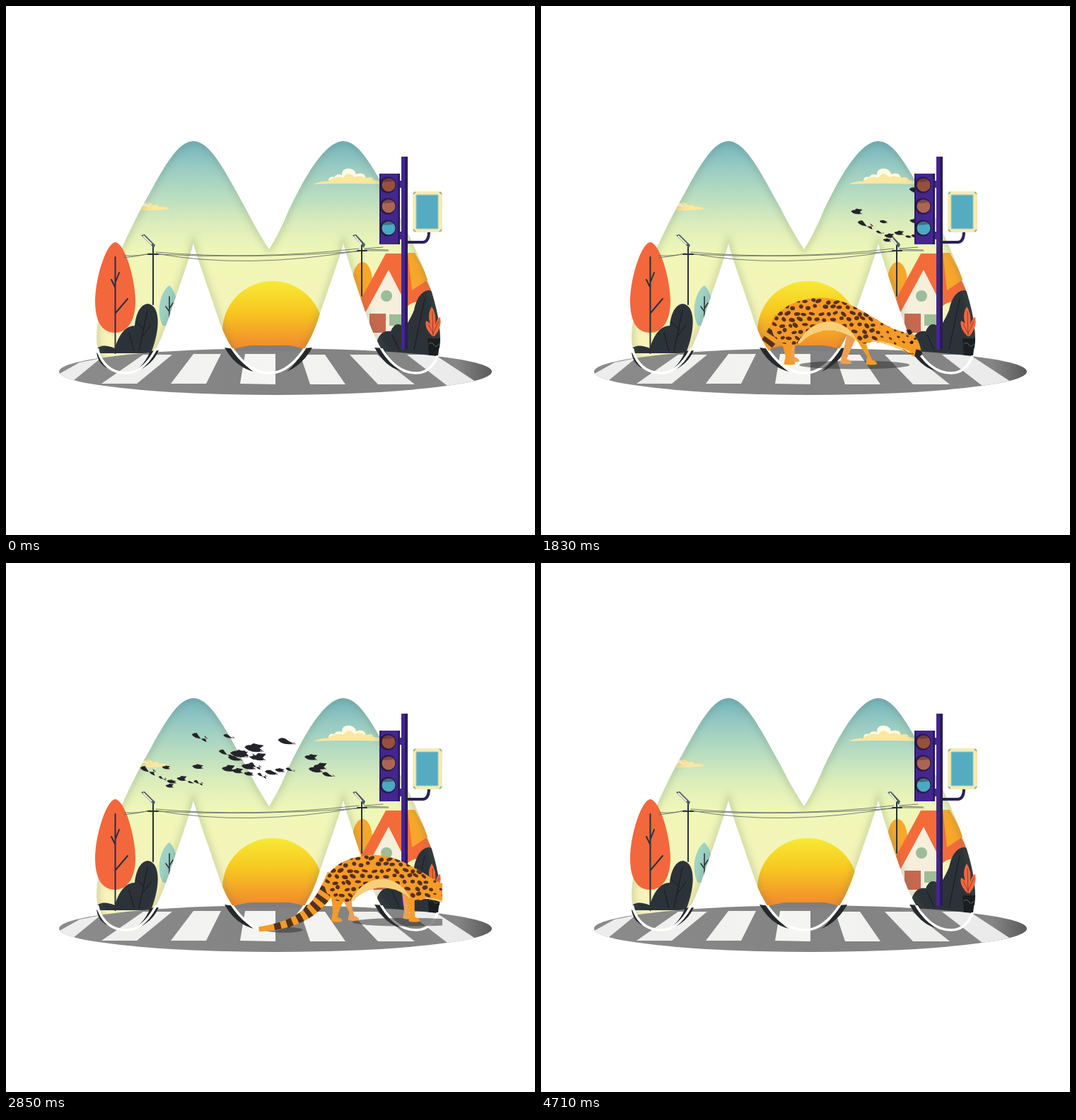
An HTML page that plays this animation: 748 px wide and 748 px high, repeating every 4.74 s.

```html
<!DOCTYPE html>
<html lang="en">
<head>
<meta charset="utf-8">
<title>Crossing</title>
<style>
html, body { margin: 0; width: 100%; height: 100%; overflow: hidden; background: #fff; }
svg { display: block; width: 100vw; height: 100vh; }
.line { fill: none; stroke: #26313a; stroke-linecap: round; }
.dark { fill: #2c3338; }
.coat { fill: #f59b26; }
</style>
</head>
<body>
<svg viewBox="0 0 748 748">
<defs>
  <linearGradient id="sky" x2="0" y2="1">
    <stop stop-color="#74b4bc"/><stop offset=".12" stop-color="#9accc3"/>
    <stop offset=".25" stop-color="#bcdfc0"/><stop offset=".36" stop-color="#dcedba"/>
    <stop offset=".48" stop-color="#eff7b7"/><stop offset="1" stop-color="#fbf1ba"/>
  </linearGradient>
  <linearGradient id="sunlight" x2="0" y2="1">
    <stop stop-color="#f7ea35"/><stop offset=".3" stop-color="#f7c820"/><stop offset=".64" stop-color="#f28e2c"/>
  </linearGradient>
  <linearGradient id="asphalt">
    <stop stop-color="#8b8b8b"/><stop offset=".5" stop-color="#838383"/>
    <stop offset=".92" stop-color="#858585"/><stop offset="1" stop-color="#5a5a5a"/>
  </linearGradient>
  <linearGradient id="paint">
    <stop stop-color="#ececec"/><stop offset=".5" stop-color="#f5f5f3"/><stop offset="1" stop-color="#e9e9e9"/>
  </linearGradient>
  <filter id="soft" x="-10%" y="-10%" width="120%" height="120%"><feGaussianBlur stdDeviation="5"/></filter>
  <path id="letter" d="M265 191C240 191 218 238 190 288C160 345 128 420 128 470C128 500 145 519 170 519C200 519 217 480 230 441C242 405 257 365 265 336C273 365 288 405 300 441C314 485 340 519 373 519C402 519 428 485 442 441C454 405 469 365 477 336C485 365 499 405 511 441C525 480 545 519 580 519C600 519 614 500 614 470C614 420 582 345 552 288C524 238 502 191 477 191C452 191 424 238 400 288C391 310 381 330 372 344C363 330 351 310 340 288C312 238 290 191 265 191Z"/>
  <clipPath id="inLetter"><use href="#letter"/></clipPath>
  <clipPath id="inRoad"><ellipse cx="381" cy="517" rx="306" ry="33"/></clipPath>
  <clipPath id="onRoad"><path d="M60 484H700V560H60Z"/></clipPath>
  <clipPath id="flight"><path d="M265 191C240 191 218 238 190 288C160 345 128 420 128 470H614C614 420 582 345 552 288C524 238 502 191 477 191Z"/></clipPath>
  <clipPath id="walk"><path d="M265 336C273 365 288 405 300 441C313 478 330 505 350 517V535H617V336Z"/></clipPath>
  <path id="torso" d="M403 452C408 432 432 414 472 413C512 414 536 437 575 457Q586 460 592 463Q597 458 601 463C610 470 615 484 614 493Q607 499 598 493C582 484 562 476 545 475Q530 482 518 470Q502 459 482 459Q457 462 444 477C425 484 402 476 403 452Z"/>
  <clipPath id="inTorso"><use href="#torso"/></clipPath>
</defs>

<g clip-path="url(#inLetter)">
  <use href="#letter" fill="url(#sky)"/>
  <path fill="#fbe79e" d="M180 289C194 287 186 281 196 279Q205 276 208 282Q215 280 216 284Q226 283 231 287Q214 290 180 289Z"/>
  <path fill="#fff8dc" d="M184 286Q190 276 197 279L203 284Q194 281 184 286Z"/>
  <path fill="#fbe79e" d="M435 252Q447 247 456 248Q456 241 464 243Q468 237 475 240C474 228 492 227 495 238Q507 234 509 243Q518 240 520 246L532 248V252Q480 250 435 252Z"/>
  <path fill="#fffbe6" d="M456 247Q457 240 464 242Q468 236 475 239C474 227 493 227 495 238Q507 234 508 243Q500 238 493 242Q483 232 477 243Q467 239 456 247Z"/>
  <circle cx="377" cy="460" r="71" fill="url(#sunlight)"/>
  <path fill="#9fd3c4" d="M231 395C217 405 212 435 222 452H245C243 425 242 405 231 395Z"/>
  <path class="line" stroke-width="1.6" d="M231 411V446M226 425L231 432M236 420L231 428"/>
  <ellipse cx="504" cy="389" rx="14" ry="27" fill="#f8a72a"/>
  <path fill="#f46b3a" d="M537 350H576L606 412L574 420L556 432H505L500 418Z"/>
  <path fill="#f8a72a" d="M568 349H578L598 386L574 402Z"/>
  <path fill="#f6efdc" d="M541 373L509 432V470H570V430Z"/>
  <circle cx="538" cy="410" r="8" fill="#9dbc98"/>
  <path fill="#c8694f" d="M514 435H537V462H514Z"/>
  <path fill="#9dbc98" d="M542 436H559V452H542Z"/>
  <path class="dark" d="M522 487C524 468 531 458 544 460Q551 443 564 455Q573 440 577 430C581 410 590 402 599 402Q619 408 618 470V496H522Z"/>
  <path class="line" stroke-width="1" style="stroke:#151b20" d="M592 414L577 486M546 465L556 486"/>
  <path class="dark" d="M126 491C128 478 142 479 154 484C160 463 170 452 182 452C184 432 192 421 201 421C218 424 219 455 205 491Z"/>
  <path class="line" stroke-width="1" style="stroke:#141a1e" d="M200 430L188 488M196 458L184 447M193 467L205 451M174 462L181 488"/>
  <path fill="#787878" d="M305 500Q320 481 350 480H398Q425 482 440 500Z"/>
  <use href="#letter" fill="none" stroke="#536b55" stroke-opacity=".25" stroke-width="8" filter="url(#soft)"/>
</g>

<path fill="#f3673d" d="M155 334C142 334 126 385 126 417C126 448 137 462 154 462C173 462 183 443 183 417C182 382 168 337 155 334Z"/>
<path class="line" stroke-width="2" d="M154.500 355V491M149 387L154.500 398M160 377L154.500 391M172 414L155 434"/>
<path class="line" stroke-width=".9" style="stroke:#65716b" d="M167 353Q187 354 204 350M167 356Q186 354 204 350M212 348Q350 360 499 343M212 351Q350 358 499 347M212 350Q340 373 499 346M507 343L533 341M507 346H541M507 344L540 345"/>
<path class="line" stroke-width="2" d="M208 340V422M503 337V410M201 351H215M497 346H510"/>
<path fill="#4c5c62" d="M191 324L196 323L211 338L209 342Z M490 324L495 323L508 337L506 342Z"/>
<path stroke="#f5f5dc" stroke-width="2" d="M194 325L206 337M493 325L503 337"/>

<ellipse cx="381" cy="517" rx="306" ry="33" fill="url(#asphalt)"/>
<path fill="#7f7f7f" d="M313 488Q330 480 372 480T431 488Z"/>
<g clip-path="url(#inRoad)" fill="url(#paint)">
  <path d="M70 523L104 504L134 498L95 530Z M135 534L194 493H235L185 534Z M233 534L265 492H304L283 534Z M331 534L338 492H381V535Z M430 535L416 493H451L480 535Z M526 535L486 493H525L578 535Z M624 537L567 493H606L670 535Z"/>
</g>
<path fill="#25292b" d="M216 487Q205 512 176 519Q194 512 204 488Z M309 483Q324 510 350 517Q332 505 323 485Z M433 483Q420 507 397 517Q414 502 421 484Z M521 483Q537 512 560 516Q543 504 534 484Z M128 490Q130 506 143 512L133 494Z"/>
<use href="#letter" fill="none" stroke="#fff" stroke-width="3.500" clip-path="url(#onRoad)"/>
<path fill="#1a1e21" d="M596 470H614L611 494H598Z"/>
<path fill="#f3673d" d="M603 467Q591 455 594 445Q600 447 602 455Q594 438 602 425Q609 435 607 451Q610 440 614 440Q617 454 606 467Z"/>
<path class="line" stroke-width=".8" style="stroke:#7b3527" d="M604 470L603 432M604 463L597 450M604 463L612 446"/>
<path class="line" stroke-width=".8" style="stroke:#777" d="M598 478Q602 474 605 479T612 478"/>

<g clip-path="url(#flight)"><g id="birds" fill="#24242b"></g></g>

<path fill="none" stroke="#2d2259" stroke-width="4" d="M566 334H590Q598 333 598 319"/>
<path fill="#43268f" d="M559 213H568V485H559Z M555 247H561V257H555Z M555 319H561V330H555Z"/>
<path fill="#2a1c58" d="M564 213H568V485H564Z"/>
<path fill="#43268f" d="M528 237H557V337H528Z"/>
<path fill="#2c1a62" d="M528 237H530V337H528Z M554 237H557V337H554Z"/>
<g id="lamps"></g>
<rect x="575" y="262" width="42" height="58" rx="3" fill="#f7eab3"/>
<path stroke="#66aeb1" stroke-width="1.500" d="M576 266L579 263M613 263L616 266M576 316L579 319M613 319L616 316"/>
<path fill="#55acc1" stroke="#aac9b3" stroke-width="1" d="M580 267H611V315H580Z"/>

<g clip-path="url(#walk)"><g id="cat">
  <g fill="#333" fill-opacity=".55"><ellipse cx="520" cy="508" rx="78" ry="6"/><ellipse cx="345" cy="519" rx="27" ry="4"/></g>
  <path id="farHind" fill="#eda052"/><path id="farFore" fill="#eda052"/>
  <g id="tail"></g>
  <path id="nearHind" class="coat"/>
  <use href="#torso" class="coat"/>
  <path id="nearFore" class="coat"/>
  <g clip-path="url(#inTorso)">
    <g id="spots" fill="#58301f"></g>
    <path fill="#f8cf78" d="M436 484Q454 446 487 447Q512 450 524 474L512 480Q475 452 440 488Z M546 473Q575 476 599 489L592 498Q565 483 542 478Z"/>
  </g>
  <path fill="#25262b" d="M607 486Q615 486 616 492Q613 498 605 496Z M593 459Q599 455 602 463L597 466Z"/>
  <circle cx="601" cy="476" r="2.300" fill="#231b19"/>
  <path fill="none" stroke="#633521" d="M589 486Q597 494 604 492"/>
</g></g>
</svg>
<script>
const LOOP = 4740, TAU = Math.PI * 2;
const get = id => document.getElementById(id);
const add = (parent, tag, attrs) => {
  const el = document.createElementNS('http://www.w3.org/2000/svg', tag);
  for (const name in attrs) el.setAttribute(name, attrs[name]);
  return get(parent).appendChild(el);
};
let seed = 11;
const random = () => (seed = seed * 16807 % 2147483647) / 2147483647;

// Traffic lamps
[['#98503d', 253], ['#ac6554', 283], ['#4aaac2', 314]].forEach(([fill, cy]) => {
  add('lamps', 'circle', { cx: 540, cy, r: 11.5, fill: '#261943' });
  add('lamps', 'circle', { cx: 541, cy, r: 9.5, fill });
  add('lamps', 'path', { d: `M532 ${cy - 5}A10 10 0 0 1 549 ${cy - 6}Q540 ${cy - 3} 532 ${cy - 5}Z`, fill: '#3d263f', opacity: .45 });
});

// Coat spots, in offset rows
for (let row = 0; row < 8; row++)
  for (let x = 403 + row % 2 * 6; x < 606; x += 11) {
    const size = x > 555 ? .6 : 1;
    const cx = x + random() * 5, cy = 416 + row * 8.5 + random() * 4;
    add('spots', 'ellipse', {
      cx, cy, rx: (2.8 + random() * 1.8) * size, ry: (2 + random()) * size,
      transform: `rotate(${(random() - .4) * 80} ${cx} ${cy})`
    });
  }

// Tapered, banded tail along a cubic curve
const bezier = (u, a, b, c, d) => (1 - u) ** 3 * a + 3 * u * (1 - u) ** 2 * b + 3 * u * u * (1 - u) * c + u ** 3 * d;
const tailPoint = u => [bezier(u, 418, 398, 378, 311), bezier(u, 442, 482, 511, 518)];
const tailRim = (u, side) => {
  const [x, y] = tailPoint(u), [p, q] = tailPoint(u + .01);
  const w = side * (12 - 8.5 * u) / Math.hypot(p - x, q - y);
  return [x - (q - y) * w, y + (p - x) * w].join(' ');
};
const BANDS = 18;
for (let i = 0; i < BANDS; i++) {
  const u = i / BANDS, v = (i + 1.1) / BANDS;
  add('tail', 'path', {
    d: `M${tailRim(u, 1)}L${tailRim(v, 1)}L${tailRim(v, -1)}L${tailRim(u, -1)}Z`,
    fill: i % 2 && i > 2 && i < 16 ? '#53301f' : '#f59b26'
  });
}

// Flock layout: x, y, size
const flock = [
  [289, 283, 7], [302, 300, 10], [327, 297, 5], [322, 312, 5], [335, 317, 6], [332, 323, 5],
  [349, 313, 6], [362, 318, 4], [372, 296, 7], [373, 318, 6], [375, 253, 10],
  [416, 253, 7], [412, 276, 9], [431, 278, 11], [443, 278, 10], [452, 270, 12], [458, 283, 9],
  [425, 284, 9], [415, 299, 8], [428, 302, 7], [444, 296, 9], [453, 294, 8], [444, 306, 6],
  [463, 308, 6], [476, 304, 8], [488, 301, 6], [503, 300, 6], [498, 260, 11],
  [532, 283, 8], [539, 300, 9], [545, 296, 8], [557, 307, 8]
].map(([x, y, size]) => ({
  x, y, size, phase: random(),
  body: add('birds', 'path', {}), tip: add('birds', 'path', { fill: '#c98f9a' })
}));

// Flock offset over time: ms, x, y
const drift = [[0, 434, 42], [960, 285, 28], [1830, 158, 8], [2460, 0, 0], [3240, -200, -16], [3750, -287, -6], [4740, -490, 0]];
function flockShift(t) {
  const i = drift.findIndex(key => key[0] > t), a = drift[i - 1], b = drift[i];
  const u = (t - a[0]) / (b[0] - a[0]);
  return [a[1] + (b[1] - a[1]) * u, a[2] + (b[2] - a[2]) * u];
}

function drawBirds(t) {
  const [dx, dy] = flockShift(t);
  for (const { x, y, size, phase, body, tip } of flock) {
    const flap = Math.sin((t / 330 + phase) * TAU) * .6;
    const place = `translate(${x + dx} ${y + dy + flap}) rotate(8) scale(${size / 9})`;
    body.setAttribute('transform', place);
    tip.setAttribute('transform', place);
    body.setAttribute('d', `M-11 0Q-9 -3 -5 -3L-2 ${-3 - 6 * flap}Q3 ${-11 * flap} 9 ${-12 * flap}Q7 ${-5 * flap} 5 -1L10 2L4 3Q-6 5 -11 0Z`);
    tip.setAttribute('d', 'M6 1L11 2L6 3Z');
  }
}

function drawLeg(id, hip, reach, turn, width) {
  const foot = hip + 2 + Math.sin(turn) * reach, lift = Math.max(0, Math.cos(turn)) * 4;
  const knee = (hip + foot) / 2, y = 507 - lift;
  get(id).setAttribute('d', `M${hip - width} 453Q${knee - 6} 480 ${foot - 4} ${y - 11}L${foot - 6} ${y}Q${foot + 3} ${y + 2} ${foot + 10} ${y}Q${foot + 9} ${y - 5} ${foot + 3} ${y - 6}Q${knee + 3} 482 ${hip + width} 457Z`);
}

function frame() {
  const t = performance.now() % LOOP, turn = (t - 960) / 870 * TAU + 1.9;
  drawBirds(t);
  drawLeg('nearFore', 523, 18, turn, 10);
  drawLeg('farFore', 520, 17, turn + Math.PI, 9);
  drawLeg('nearHind', 425, 10, turn + 1.3, 19);
  drawLeg('farHind', 430, 11, turn + 4.4, 12);
  get('cat').setAttribute('transform', `translate(${(t - 2460) * .122} ${Math.sin(turn * 2) * .7})`);
  get('cat').style.display = t < 4700 ? '' : 'none';
  requestAnimationFrame(frame);
}
frame();
</script>
</body>
</html>
```
